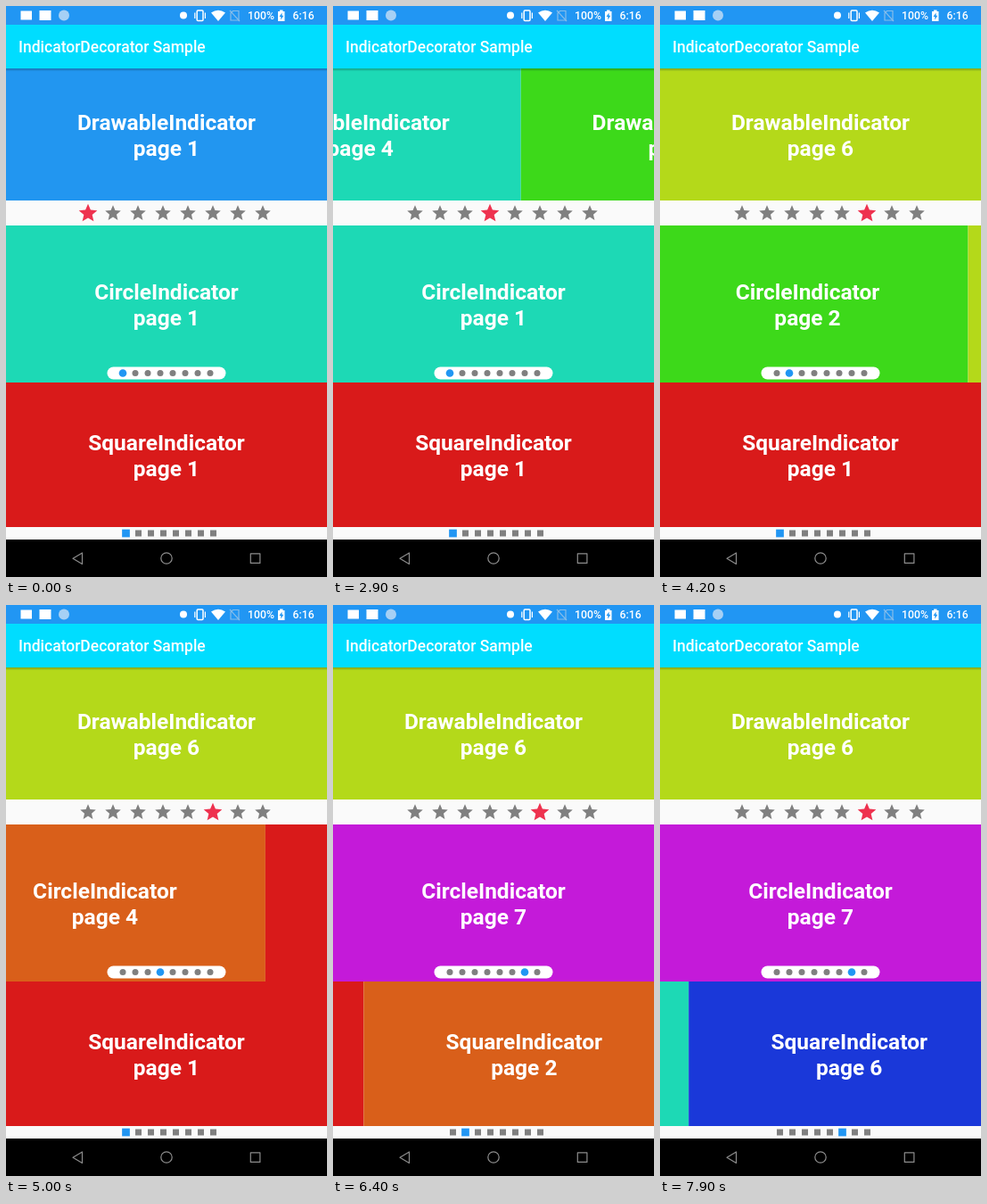
Recreate the animation shown at these times as an HTML page. Size 360x640 px, loop 8 s.

```html
<!DOCTYPE html>
<html lang="en">
<head>
<meta charset="utf-8">
<title>IndicatorDecorator Sample</title>
<style>
  html, body { margin: 0; width: 100%; height: 100%; overflow: hidden; background: #000; }
  svg { display: block; width: 360px; height: 640px; font-family: Roboto, sans-serif; fill: #fff; }
  .page { font-size: 24.5px; font-weight: 700; text-anchor: middle; }
  .title { font-size: 17.5px; font-weight: 500; }
  .status { font-size: 12.25px; font-weight: 500; }
  .nav { fill: none; stroke: #8c8c8c; stroke-width: 1.2; stroke-linejoin: round; }
</style>
</head>
<body>
<svg id="stage" viewBox="0 0 360 640">
  <defs>
    <linearGradient id="shade" x2="0" y2="1">
      <stop stop-color="#000" stop-opacity=".25"/>
      <stop offset="1" stop-color="#000" stop-opacity="0"/>
    </linearGradient>
    <path id="star" d="M0 5.27 6.18 9 4.54 1.97 10 -2.76 2.81 -3.37 0 -10 -2.81 -3.37 -10 -2.76 -4.54 1.97 -6.18 9z"/>
    <circle id="dot" r="4"/>
    <rect id="box" x="-4" y="-4" width="8" height="8"/>
  </defs>
  <rect y="70" width="360" height="528" fill="#fafafa"/>
  <g id="pagers"></g>
  <rect x="113.5" y="404.5" width="133" height="14" rx="7"/>
  <g id="marks"></g>

  <rect y="70" width="360" height="3.5" fill="url(#shade)"/>
  <rect width="360" height="21" fill="#2196f3"/>
  <rect y="21" width="360" height="49" fill="#00ddff"/>
  <text class="title" x="14" y="52">IndicatorDecorator Sample</text>

  <g id="statusIcons">
    <rect x="16.5" y="5.5" width="12.5" height="10"/>
    <rect x="37.5" y="5" width="13" height="11"/>
    <circle cx="65" cy="10.5" r="6" fill="#a6d0f5"/>
    <circle cx="199" cy="10.5" r="4"/>
    <rect x="214.2" y="5" width="6.8" height="11.5" rx="1" fill="none" stroke="#fff" stroke-width="1.5"/>
    <path d="M211.8 7.5v6.5M223.4 7.5v6.5" stroke="#fff" stroke-width="1.2"/>
    <path d="M230 7.6Q238 1.8 246 7.6L238 17z"/>
    <g fill="none" stroke="#86bdea" stroke-width="1.2">
      <path d="M254.5 5.5H261V16H252V8z"/>
      <path d="M251 5l11 12"/>
    </g>
    <text class="status" x="271" y="15">100%</text>
    <path d="M305 6h2V4.5h3.5V6h2v11H305z"/>
    <path d="M309.5 7.5l-3 4.5h1.8v3.5l3-4.8h-1.8z" fill="#2196f3"/>
    <text class="status" x="321.5" y="15">6:16</text>
  </g>

  <rect y="598" width="360" height="42" fill="#000"/>
  <g class="nav">
    <path d="M85.5 613v12.4L75 619.2z"/>
    <circle cx="180" cy="619" r="6.2"/>
    <rect x="274.3" y="613.8" width="10.6" height="10.6"/>
  </g>
</svg>
<script>
const PERIOD = 8000, PAGES = 8, WIDTH = 360;
const COLORS = ['#2296f0', '#c41ad9', '#1a38d9', '#1dd9b5', '#3dd91a', '#b4d91a', '#d95f1a', '#d91a1a'];
const DRAG_TIME = 0.4, DRAG_DISTANCE = 0.42;

// A run of evenly spaced swipes, each [start, duration] in ms.
const run = (first, count) => Array.from({ length: count }, (_, i) => [first + i * 371.6, 370]);

const pagers = [
  { name: 'Drawable', top: 70, height: 148, color: i => i,
    mark: { shape: 'star', x: 92, y: 232, gap: 28, size: 0.875, big: 1.03, on: '#ee324f' },
    swipes: [[770, 720], [1564, 400], [2020, 460], [2690, 532], [3180, 350]] },
  { name: 'Circle', top: 246, height: 176, color: i => i + 3,
    mark: { shape: 'dot', x: 131, y: 411.5, gap: 14, size: 0.875, big: 1.08, on: '#2196f3' },
    swipes: [[3690, 460], ...run(4170, 5)] },
  { name: 'Square', top: 422, height: 162, color: i => 7 - i,
    mark: { shape: 'box', x: 134.5, y: 591, gap: 14, size: 0.875, big: 1.09, on: '#2196f3' },
    swipes: [[6070, 493], ...run(6535, 4).map(([s, d], i) => [s + i, d])] },
];
// The last swipe begins a touch late.
pagers[2].swipes[4][0] = 7650;

function add(parent, tag, attrs, text = '') {
  const node = document.createElementNS('http://www.w3.org/2000/svg', tag);
  for (const key in attrs) node.setAttribute(key, attrs[key]);
  node.textContent = text;
  return parent.appendChild(node);
}

function build(pager) {
  const { name, top, height, mark } = pager;
  const view = add(document.getElementById('pagers'), 'svg', { y: top, width: WIDTH, height });
  pager.strip = add(view, 'g', {});
  for (let i = 0; i < PAGES; i++) {
    const x = i * WIDTH, base = height / 2 - 4.7;
    add(pager.strip, 'rect', { x, width: WIDTH, height, fill: COLORS[pager.color(i) % PAGES] });
    add(pager.strip, 'text', { class: 'page', x: x + WIDTH / 2, y: base }, name + 'Indicator');
    add(pager.strip, 'text', { class: 'page', x: x + WIDTH / 2, y: base + 28.7 }, 'page ' + (i + 1));
  }
  const row = document.getElementById('marks');
  pager.marks = Array.from({ length: PAGES }, () => add(row, 'use', { href: '#' + mark.shape }));
}

// Finger drag speeding up, then a decelerating settle.
function swipe(u) {
  if (u <= 0) return 0;
  if (u >= 1) return 1;
  if (u < DRAG_TIME) return DRAG_DISTANCE * (u / DRAG_TIME) ** 1.5;
  return 1 - (1 - DRAG_DISTANCE) * ((1 - u) / (1 - DRAG_TIME)) ** 3;
}

function render(pager, time) {
  let position = 0, selected = 0;
  for (const [start, duration] of pager.swipes) {
    const u = (time - start) / duration;
    position += swipe(u);
    if (u >= DRAG_TIME) selected++;
  }
  pager.strip.setAttribute('transform', `translate(${-position * WIDTH} 0)`);
  const { x, y, gap, size, big, on } = pager.mark;
  pager.marks.forEach((node, i) => {
    const active = i === selected;
    node.setAttribute('fill', active ? on : '#808080');
    node.setAttribute('transform', `translate(${x + i * gap} ${y}) scale(${active ? big : size})`);
  });
}

function frame() {
  const time = performance.now() % PERIOD;
  pagers.forEach(pager => render(pager, time));
  requestAnimationFrame(frame);
}

pagers.forEach(build);
frame();
</script>
</body>
</html>
```
